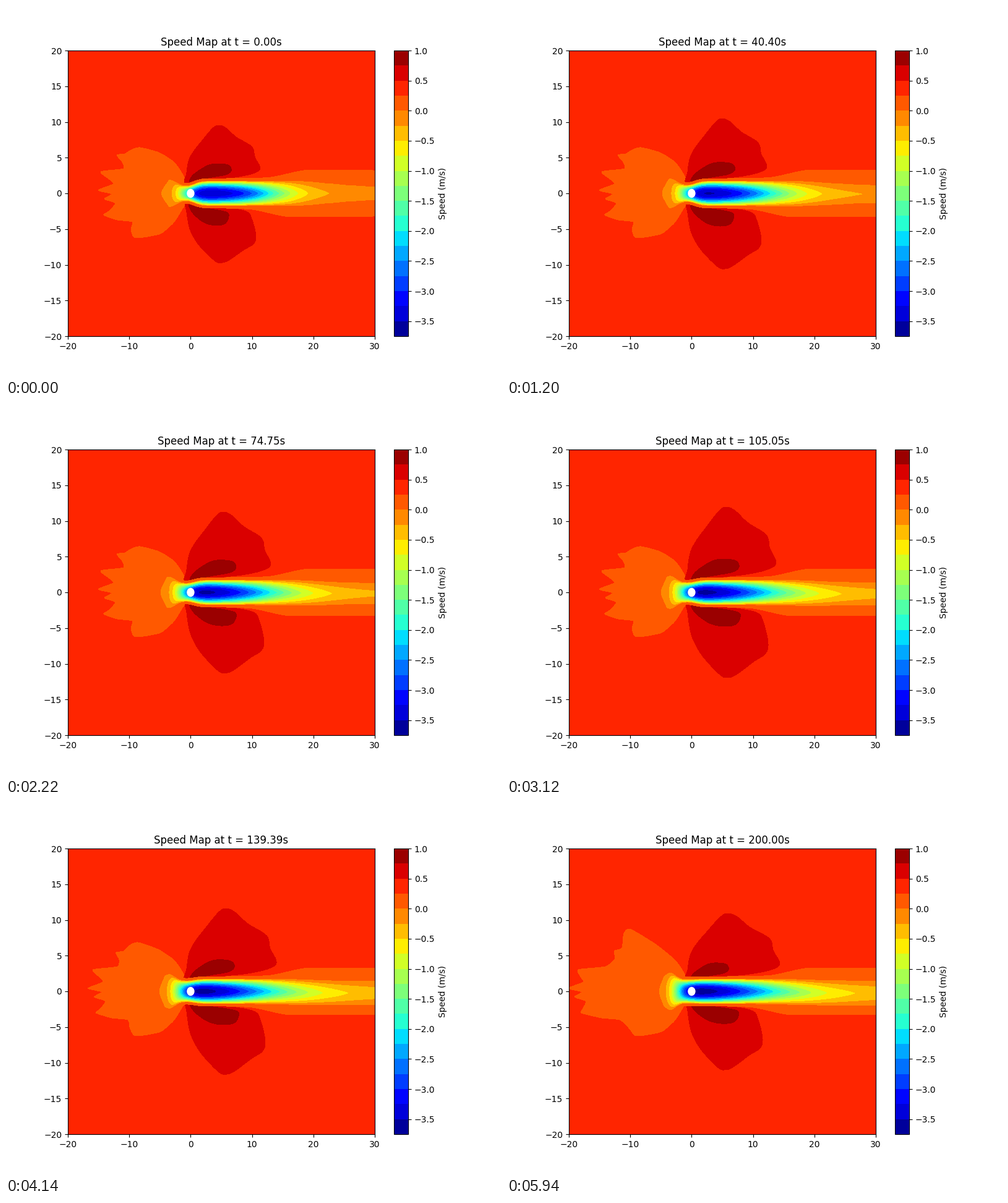
Write a matplotlib script that moves like this. It is 800 px wide and 600 px high and loops after 6 s.

```python
import numpy as np
import matplotlib.pyplot as plt
from matplotlib.animation import FuncAnimation
from matplotlib.colors import Normalize
from matplotlib.patches import Ellipse, Polygon

FRAMES = 100
END_TIME = 200.0
LEVELS = np.arange(-3.75, 1.01, 0.25)
NORM = Normalize(-3.75, 1.0)
JET = plt.get_cmap("jet")
AXIS_Y = 303  # wake axis on the stage, in pixels

# Slow region ahead of the cylinder, in stage pixels.
FRONT = np.array([
    (292, 288), (284, 270), (271, 252), (247, 237), (217, 229), (204, 232), (192, 239),
    (179, 241), (187, 251), (190, 263), (153, 268), (168, 281), (173, 288), (149, 298),
    (171, 304), (159, 312), (177, 319), (166, 332), (158, 338), (180, 346), (204, 349),
    (202, 362), (207, 374), (222, 374), (250, 368), (271, 350), (285, 328), (292, 317)], float)

# Fast regions at full size, as offsets from an anchor beside the cylinder.
TOP, BOTTOM = (291, 287), (291, 318)
UPPER = [(0, 0), (1, -21), (5, -47), (14, -66), (30, -88), (52, -116), (64, -122), (78, -116),
         (98, -97), (128, -77), (134, -55), (144, -32), (130, -21), (95, -13), (50, -8)]
LOWER = [(0, 0), (1, 18), (6, 50), (15, 72), (29, 93), (54, 119), (66, 123), (80, 118),
         (108, 97), (127, 84), (131, 66), (123, 32), (113, 18), (80, 11), (30, 5)]
UPPER_CORE = [(6, -3), (12, -15), (27, -27), (44, -36), (61, -38),
              (79, -35), (84, -25), (74, -17), (48, -12), (15, -6)]
LOWER_CORE = [(6, 4), (10, 14), (21, 25), (39, 36), (61, 40),
              (80, 36), (86, 20), (70, 14), (42, 10), (15, 6)]

# outline, anchor, width and height at start, middle and end, band value
LOBES = [
    (UPPER, TOP, (0.83, 1, 1.04), (0.77, 1, 0.9), 0.625),
    (LOWER, BOTTOM, (0.86, 1, 0.93), (0.79, 1, 0.91), 0.625),
    (UPPER_CORE, TOP, (0.87, 1, 0.8), (0.84, 1, 0.79), 0.875),
    (LOWER_CORE, BOTTOM, (0.8, 1, 0.97), (0.92, 1, 0.93), 0.875),
]


def lerp(a, b, f):
    return a + (b - a) * f


def ease(f):
    f = np.clip(f, 0, 1)
    return f * f * (3 - 2 * f)


def bell(x, centre, width, power=2):
    return np.exp(-np.abs((x - centre) / width) ** power)


def logistic(x):
    return 1 / (1 + np.exp(-x))


def smooth(p, k, n=6):
    """Closed cubic curve through the points; k sets the roundness."""
    t = np.linspace(0, 1, n, endpoint=False)[:, None, None]
    q = np.roll(p, -1, 0)
    m = k * (q - np.roll(p, 1, 0))
    curve = ((2 * t**3 - 3 * t**2 + 1) * p + (t**3 - 2 * t**2 + t) * m
             + (3 * t**2 - 2 * t**3) * q + (t**3 - t**2) * np.roll(m, -1, 0))
    return curve.transpose(1, 0, 2).reshape(-1, 2)


def data_x(px):
    return (px - 100) / 9.92 - 20


def data_y(py):
    return 20 - (py - 72) / 11.55


def front_outline(t):
    """The fingers reach upstream and the crown rises late in the run."""
    reach = np.clip((t - 0.55) / 0.45, 0, 1)
    fingers = reach * bell(FRONT[:, 1], AXIS_Y, 48, 4) * (FRONT[:, 0] < 230)
    crown = reach**1.5 * bell(FRONT[:, 1], 228, 9)
    shift = np.column_stack([-50 * fingers - 18 * crown, -27 * crown])
    return smooth(FRONT + shift, 0.3)


def lobe_outline(points, anchor, width, height, t):
    """The lobes swell until mid-run, then settle."""
    scale = [np.interp(t, (0, 0.53, 1), size) for size in (width, height)]
    return smooth(np.array(anchor) + np.array(points) * scale, 0.5)


grid_x = np.arange(238, 598.5, 1.5)
grid_y = np.arange(AXIS_Y - 45, AXIS_Y + 45.5, 0.75)[:, None]


def wake_speed(t):
    x, dy = grid_x, grid_y - AXIS_Y
    grown = 1 - (1 - t) ** 2

    # speed along the axis: drops at the cylinder, recovers downstream
    onset = logistic((x - lerp(289, 277, t)) / 9)
    recovery = logistic((lerp(430, 421, grown) - x) / lerp(28, 47, grown))
    deficit = lerp(3.45, 3.75, grown) * recovery + lerp(0.13, 0.33, grown)
    centre = lerp(0.05, 0.12, t) * (1 - onset) - deficit * onset

    # half-height of the zero-speed line and of the outer edge
    half = (21 - lerp(8, 1, t) * bell(x, 291, 18) + lerp(3, 10, t) * bell(x, 264, 12)
            - lerp(9, 0, grown) * ease((x - 450) / 147))
    flare = ease((x - np.where(dy < 0, 415, 385)) / 80)
    edge = np.maximum(16 + 9 * ease((x - 298) / 75) + 13 * flare, half + 3)

    off = np.abs(dy - 3 * grown * ease((x - 400) / 150))
    power = lerp(2.2, 1.5, ease((x - 330) / 120))
    inner = centre + np.maximum(-centre, 0.15) * (off / half) ** power
    outer = 0.25 * (np.abs(dy) - half) / (edge - half) + np.maximum(centre + 0.15, 0)
    return np.maximum(np.where(off < half, inner, np.maximum(outer, 0.01)), -3.74)


def add_region(value):
    return ax.add_patch(Polygon([(0, 0), (1, 0), (0, 1)], fc=JET(NORM(value)), lw=0,
                                antialiased=False, zorder=1.1))


def place(patch, line):
    patch.set_xy(np.column_stack([data_x(line[:, 0]), data_y(line[:, 1])]))


fig, ax = plt.subplots(figsize=(8, 6), dpi=100)
base = ax.contourf([-20, 30], [-20, 20], np.full((2, 2), 0.4),
                   levels=LEVELS, cmap=JET, norm=NORM)
fig.colorbar(base, ax=ax, label="Speed (m/s)")
ax.set_xlim(-20, 30)
ax.set_ylim(-20, 20)
title = ax.set_title("")

front = add_region(0.125)
lobes = [add_region(lobe[-1]) for lobe in LOBES]
ax.add_patch(Ellipse((0, 0), 1.25, 1.25, fc="white", lw=0, zorder=1.3))
wake = None


def update(frame):
    global wake
    t = frame / (FRAMES - 1)
    title.set_text(f"Speed Map at t = {END_TIME * t:.2f}s")
    place(front, front_outline(t))
    for patch, (points, anchor, width, height, _) in zip(lobes, LOBES):
        place(patch, lobe_outline(points, anchor, width, height, t))
    if wake is not None:
        wake.remove()
    wake = ax.contourf(data_x(grid_x), data_y(grid_y[:, 0]), wake_speed(t),
                       levels=LEVELS[:17], cmap=JET, norm=NORM, zorder=1.2)
    return []


anim = FuncAnimation(fig, update, frames=FRAMES, interval=60,
                     init_func=lambda: update(0), repeat=True, repeat_delay=0)
plt.show()
```
